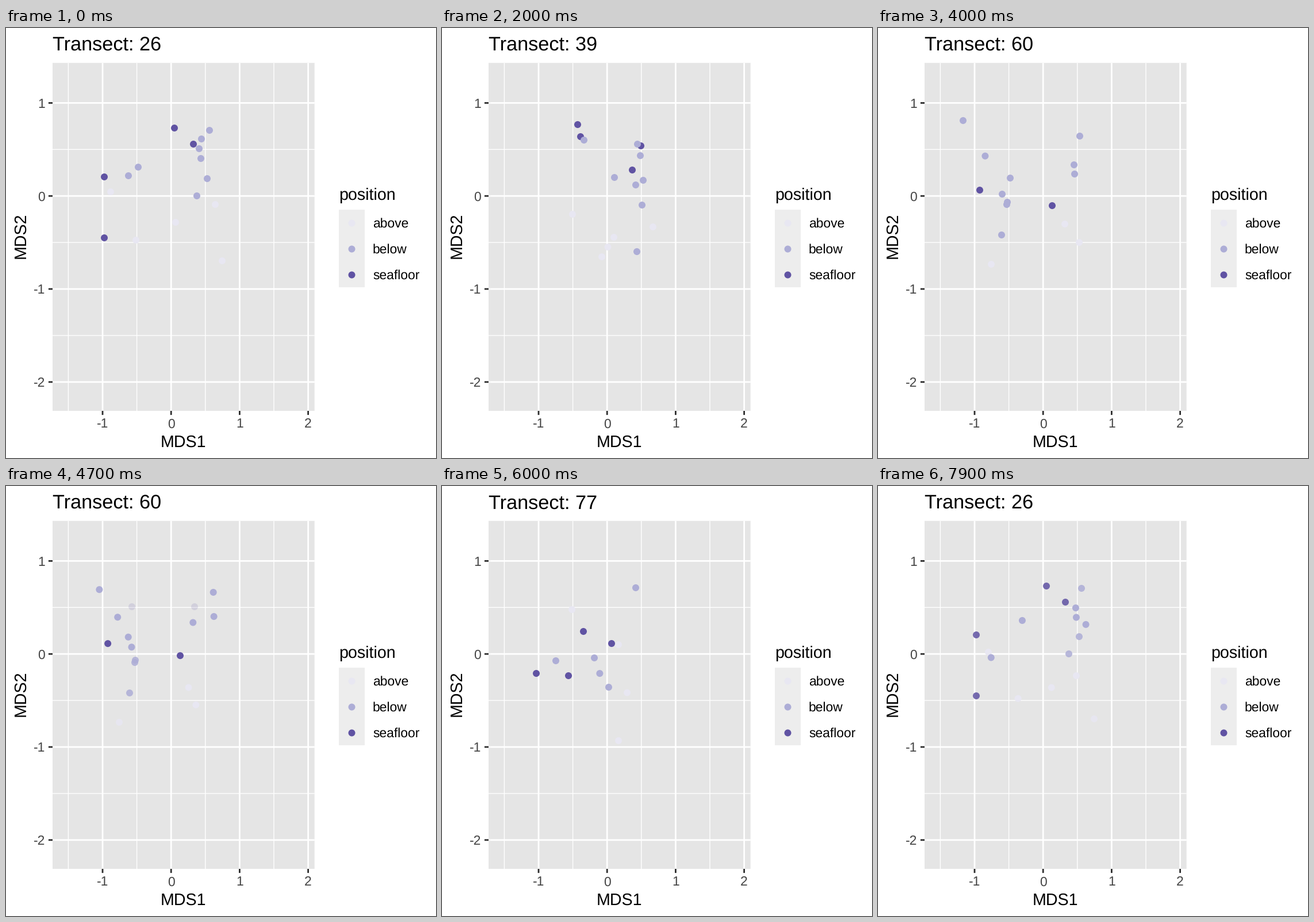
A matplotlib script for the animation above (8 s loop, 748 px wide and 748 px high).

```python
import math
import random
from itertools import zip_longest

import matplotlib.pyplot as plt
from matplotlib.animation import FuncAnimation
from matplotlib.colors import to_rgba
from matplotlib.patches import Rectangle

SIZE, DPI = 748, 187
BASE = 11                      # base font size in points
SMALL, LARGE = 0.8 * BASE, 1.2 * BASE
EM = SMALL * DPI / 72          # tick label em in pixels
LEFT, RIGHT, TOP, BOTTOM = 81, 536.7, 60.7, 666
COLORS = {"seafloor": "#6053a3", "above": "#e8e7f2", "below": "#adadd6"}
DOT = 12                       # dot diameter in pixels
HOLD, MOVE = 6, 4              # frames at rest and in transition
STEP = HOLD + MOVE

plt.rcParams.update({
    "font.family": "Liberation Sans",
    "text.hinting": "none",
    "path.snap": False,
    "toolbar": "None",
})

rng = random.Random(48)


def pt(px):
    return px * 72 / DPI


def arc(x0, y0, x1, y1, n=3, bow=0):
    """n points evenly spread on a parabola that bulges by bow pixels."""
    dx, dy = x1 - x0, y1 - y0
    length = math.hypot(dx, dy)
    points = []
    for i in range(n):
        t = i / (n - 1)
        b = 4 * bow * t * (1 - t) / length
        points.append((x0 + dx * t + dy * b, y0 + dy * t - dx * b))
    return points


def cluster(n, x, y, spread=55):
    return [(rng.gauss(x, spread), rng.gauss(y, spread)) for _ in range(n)]


def state(number, seafloor, below, above):
    groups = {"seafloor": seafloor, "above": above, "below": below}
    return f"Transect: {number}", groups


STATES = [
    state(26,
          [(293, 174), (326, 202), (171, 259), (171, 365)],
          [*arc(340, 193, 339, 227, bow=-3.5), (230, 242), (213, 257),
           (354, 178), (350, 262), (332, 292)],
          [*arc(364, 307, 226, 369), (182, 285), (376, 405)]),
    state(35,
          [(362, 88), (366, 205), (247, 254), (211, 308)],
          [(357, 138), (341, 298), (305, 326), (260, 489), (141, 342),
           (338, 382)],
          [*arc(357, 351, 351, 396, bow=8), (317, 384),
           *arc(167, 196, 249, 182, bow=-6)]),
    state(39,
          [(346, 205), (331, 247), (236, 168), (241, 189)],
          [(340, 202), *arc(345, 222, 348, 308, bow=3.5), (247, 195),
           (300, 260), (337, 273), (339, 389)],
          [(367, 346), *arc(299, 364, 278, 398), (227, 324)]),
    state(48,
          cluster(3, 290, 225),
          cluster(8, 290, 260),
          [*cluster(2, 300, 390), (516, 638)]),
    state(60,
          [(303, 309), (177, 282)],
          [(351, 188), (341, 238), (342, 254),
           *arc(216, 289, 148, 161, bow=-5),
           (230, 261), (225, 303), (224, 307), (215, 360)],
          [(325, 341), (350, 373), (197, 411)]),
    state(67,
          [(303, 214), (178, 228), (219, 210), (328, 210)],
          [(417, 167), (482, 163), (228, 141), *arc(233, 229, 246, 292),
           (112, 273)],
          [(274, 406), (216, 426)]),
    state(77,
          [(295, 274), (164, 326), (220, 330), (246, 253)],
          [(337, 177), *arc(265, 299, 290, 350, bow=-3.5), (198, 304)],
          [*arc(307, 443, 307, 276, bow=-15), (226, 215)]),
    state(83,
          [],
          [(367, 323), (397, 337), (493, 322), (373, 187), (102, 540)],
          arc(234, 464, 250, 312, n=4, bow=-115)),
]

fig = plt.figure(figsize=(SIZE / DPI, SIZE / DPI), dpi=DPI, facecolor="white")
ax = fig.add_axes([0, 0, 1, 1])
ax.set(xlim=(0, SIZE), ylim=(SIZE, 0))
ax.axis("off")


def box(x0, y0, x1, y1, color):
    ax.add_patch(Rectangle((x0, y0), x1 - x0, y1 - y0, fc=color, lw=0))


def line(x0, y0, x1, y1, color, width):
    ax.plot([x0, x1], [y0, y1], color=color, lw=pt(width),
            solid_capstyle="butt")


def label(x, y, text, size, color="black", angle=0):
    return ax.text(x, y, text, size=size, color=color, rotation=angle,
                   ha="left", va="baseline", rotation_mode="anchor")


def dot(x, y, color):
    return ax.scatter([x], [y], s=pt(DOT) ** 2, c=[color], linewidths=0,
                      zorder=3)


def to_x(v):
    return 287.2 + 119.2 * v


def to_y(v):
    return 292.2 - 161.8 * v


def tick_width(v):
    return EM * (0.556 + (0.333 if v < 0 else 0))


def draw_panel():
    box(LEFT, TOP, RIGHT, BOTTOM, "#e5e5e5")
    for v in (-1.5, -0.5, 0.5, 1.5):
        line(to_x(v), TOP, to_x(v), BOTTOM, "white", 1.4)
    for v in (-1.5, -0.5, 0.5):
        line(LEFT, to_y(v), RIGHT, to_y(v), "white", 1.4)
    for v in (-1, 0, 1, 2):
        x = to_x(v)
        line(x, TOP, x, BOTTOM, "white", 2.8)
        line(x, BOTTOM, x, BOTTOM + 7.1, "#2d2d2d", 2.8)
        label(x - tick_width(v) / 2, 695.3, str(v), SMALL, "#444444")
    for v in (-2, -1, 0, 1):
        y = to_y(v)
        line(LEFT, y, RIGHT, y, "white", 2.8)
        line(LEFT - 7.1, y, LEFT, y, "#2d2d2d", 2.8)
        label(68.3 - tick_width(v), y + 8.2, str(v), SMALL, "#444444")
    label(269, 728.7, "MDS1", BASE)
    label(33.8, 400.7, "MDS2", BASE, angle=90)


def draw_legend():
    label(578.8, 299, "position", BASE)
    box(579, 316, 624, 451, "#ededed")
    for i, name in enumerate(("above", "below", "seafloor")):
        y = 338.7 + 45 * i
        dot(601.5, y, COLORS[name])
        label(638, y + 8, name, SMALL)


draw_panel()
draw_legend()
title = label(LEFT, 39.4, "", LARGE)
cloud = dot(0, 0, "white")


def blend(old, new, e):
    """Paired points travel; unpaired ones fade in or out in place."""
    for a, b in zip_longest(old, new):
        if a and b:
            yield (a[0] + (b[0] - a[0]) * e, a[1] + (b[1] - a[1]) * e), 1
        elif a:
            yield a, 1 - e
        else:
            yield b, e


def update(frame):
    index, k = divmod(frame, STEP)
    u = max(0, k - HOLD) / MOVE
    e = (1 - math.cos(math.pi * u)) / 2
    old, new = STATES[index], STATES[(index + 1) % len(STATES)]
    points, colors = [], []
    for name, color in COLORS.items():
        for point, alpha in blend(old[1][name], new[1][name], e):
            points.append(point)
            colors.append(to_rgba(color, alpha))
    cloud.set_offsets(points)
    cloud.set_facecolors(colors)
    title.set_text(new[0] if u >= 0.5 else old[0])
    return cloud, title


anim = FuncAnimation(fig, update, frames=STEP * len(STATES), interval=100,
                     repeat=True, repeat_delay=0)
plt.show()
```
